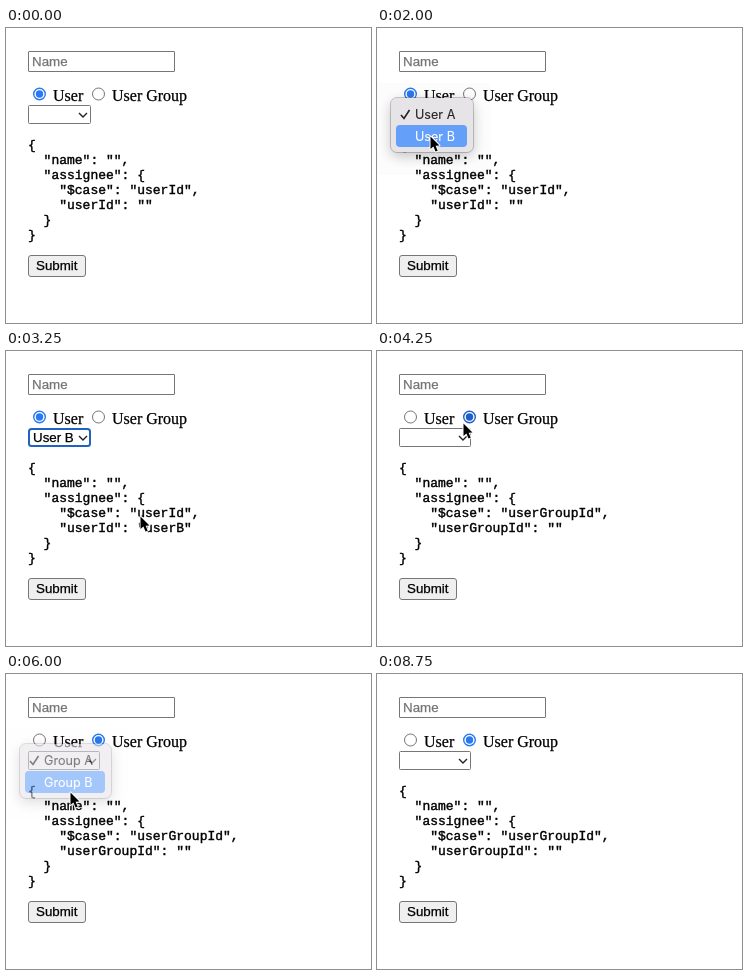
An HTML page with a canvas for the animation above (9.75 s loop, 365 by 295 pixels).

```html
<!DOCTYPE html>
<html lang="en">
<head>
<meta charset="utf-8">
<title>Assignee form</title>
<style>
html, body { margin: 0; width: 100%; height: 100%; overflow: hidden; background: #fff; }
canvas { display: block; width: 365px; height: 295px; }
</style>
</head>
<body>
<canvas id="stage" width="365" height="295"></canvas>
<script>
const WIDTH = 365, HEIGHT = 295, LOOP = 9750, STEP = 250;
const SANS = '13.333px "Liberation Sans", Arial, sans-serif';
const SERIF = '16px "Liberation Serif", "Times New Roman", serif';
const MONO = '13px "Liberation Mono", "Courier New", monospace';
const MENU = '12.6px Inter, sans-serif';
const GRAY = '#767676';

const page = document.getElementById('stage').getContext('2d');
const layer = new OffscreenCanvas(WIDTH, HEIGHT).getContext('2d');
let ctx = page;

// A gesture moves the pointer through evenly timed points in four steps, then rests.
const gestures = [
  { start: 750, path: [[157, 104], [53, 85], [53, 104]] },
  { start: 2000, path: [[53, 108], [51, 126], [146, 180]] },
  { start: 3250, path: [[134, 165], [86, 72]] },
  { start: 4750, path: [[76, 82], [62, 107], [61, 111]] },
  { start: 6000, path: [[64, 118], [150, 174], [36, 63]] },
  { start: 7250, path: [[36, 64], [56, 231], [88, 68]] },
  { start: 8500, path: [[87, 67], [87, 67]] }
];

function pointerAt(time) {
  const gesture = gestures.findLast(g => g.start <= time);
  if (!gesture || time >= 8750) return null;
  const { start, path } = gesture;
  const steps = Math.min(4, Math.floor((time - start) / STEP));
  const along = steps / 4 * (path.length - 1);
  const i = Math.min(Math.floor(along), path.length - 2);
  const [a, b] = [path[i], path[i + 1]];
  return a.map((v, axis) => v + (b[axis] - v) * (along - i));
}

function stateAt(time) {
  const within = (from, to) => time >= from && time < to;
  const chosen = within(2750, 4250) || within(6250, 7250);
  const open = within(1250, 2500) || within(5000, 6000);
  const fading = within(2500, 2750) || within(6000, 6250);
  return {
    pointer: pointerAt(time),
    group: within(4250, 7250) || within(8250, LOOP),
    value: chosen ? 'B' : '',
    menu: open ? 1 : fading ? 0.58 : 0,
    pick: within(1750, 2750) || within(5250, 6250) ? 1 : 0
  };
}

// A hairline outline gives the glyphs their heavier weight.
function text(str, x, y, font, color = '#000', weight = 0.25) {
  ctx.font = font;
  ctx.fillStyle = ctx.strokeStyle = color;
  ctx.lineWidth = weight;
  ctx.fillText(str, x, y);
  ctx.strokeText(str, x, y);
}

function box(x, y, w, h, r, fill, stroke, width = 1) {
  ctx.beginPath();
  ctx.roundRect(x, y, w, h, r);
  if (fill) {
    ctx.fillStyle = fill;
    ctx.fill();
  }
  if (stroke) {
    ctx.strokeStyle = stroke;
    ctx.lineWidth = width;
    ctx.stroke();
  }
}

function line(points, color, width) {
  ctx.beginPath();
  points.forEach(([x, y]) => ctx.lineTo(x, y));
  ctx.strokeStyle = color;
  ctx.lineWidth = width;
  ctx.stroke();
}

function radio(x, on, pointer) {
  const hover = pointer && Math.hypot(pointer[0] - x, pointer[1] - 66) < 9;
  const color = !on ? GRAY : hover ? '#1d5fc9' : '#2879f2';
  ctx.beginPath();
  ctx.arc(x, 66, on ? 5.8 : 6, 0, Math.PI * 2);
  ctx.strokeStyle = color;
  ctx.lineWidth = on ? 1.4 : 1;
  ctx.stroke();
  if (!on) return;
  ctx.beginPath();
  ctx.arc(x, 66, 3.7, 0, Math.PI * 2);
  ctx.fillStyle = color;
  ctx.fill();
}

const label = s => s.group ? 'Group ' : 'User ';

function select(s) {
  const width = s.group ? 71 : 62;
  if (s.value) box(23, 78, width - 1, 17, 2.5, '#fff', '#1f62c4', 2);
  else box(22.5, 77.5, width, 18, 1, '#fff', GRAY);
  if (s.value) text(label(s) + s.value, 27, 91, SANS);
  const mid = 15 + width;
  line([[mid - 4, 85], [mid, 89], [mid + 4, 85]], '#222', 1.4);
}

function json(s) {
  const kind = s.group ? 'group' : 'user';
  const key = s.group ? 'userGroupId' : 'userId';
  const id = s.value && kind + s.value;
  const data = { name: '', assignee: { $case: key, [key]: id } };
  JSON.stringify(data, null, 2).split('\n')
    .forEach((row, i) => text(row, 22, 121 + i * 15, MONO, '#000', 0.4));
}

function menu(s) {
  const width = s.group ? 91 : 82;
  ctx.fillStyle = 'rgba(0,0,0,0.012)';
  ctx.fillRect(0, 55, width + 31, 92);
  ctx.save();
  ctx.shadowColor = 'rgba(0,0,0,0.24)';
  ctx.shadowBlur = 14;
  ctx.shadowOffsetY = 4;
  box(14, 70, width, 54, 6, '#e7e4e8');
  ctx.restore();
  box(13.5, 69.5, width + 1, 55, 6.5, null, 'rgba(0,0,0,0.2)');
  box(19, 75 + s.pick * 22, width - 11, 22, 4, '#649ff9');
  ['A', 'B'].forEach((letter, i) => {
    const color = i === s.pick ? '#fff' : '#222';
    text(label(s) + letter, 38, 91 + i * 22, MENU, color, 0.1);
    if (i === 0) line([[24, 87], [27, 90.5], [32.5, 82]], color, 1.6);
  });
}

// The menu fades as one flat picture.
function fadeMenu(s) {
  layer.clearRect(0, 0, WIDTH, HEIGHT);
  ctx = layer;
  menu(s);
  ctx = page;
  ctx.globalAlpha = s.menu;
  ctx.drawImage(layer.canvas, 0, 0);
  ctx.globalAlpha = 1;
}

function arrow([x, y]) {
  ctx.save();
  ctx.translate(x + 0.5, y + 0.5);
  ctx.scale(0.9, 0.9);
  ctx.beginPath();
  [[0, 0], [0, 14], [3.2, 11.2], [5.6, 16.8], [8, 15.7], [5.7, 10.3], [10, 10]]
    .forEach(([px, py]) => ctx.lineTo(px, py));
  ctx.closePath();
  ctx.lineJoin = 'round';
  ctx.strokeStyle = '#fff';
  ctx.lineWidth = 2;
  ctx.stroke();
  ctx.fillStyle = '#000';
  ctx.fill();
  ctx.restore();
}

function draw(time) {
  const s = stateAt(time);
  ctx.fillStyle = '#fff';
  ctx.fillRect(0, 0, WIDTH, HEIGHT);

  box(22.5, 23.5, 146, 20, 0.5, '#fff', GRAY);
  text('Name', 26, 38, SANS, '#757575');

  radio(33.5, !s.group, s.pointer);
  text('User', 47, 73, SERIF);
  radio(92.5, s.group, s.pointer);
  text('User Group', 106, 73, SERIF);

  select(s);
  json(s);

  const pressing = s.pointer && s.pointer[1] > 227;
  box(22.5, 227.5, 57, 21, 2.5, pressing ? '#e5e5e5' : '#efefef', GRAY);
  text('Submit', 30, 242, SANS);

  if (s.menu) fadeMenu(s);
  if (s.pointer) arrow(s.pointer);
}

const begin = performance.now();
function tick() {
  draw((performance.now() - begin) % LOOP);
  requestAnimationFrame(tick);
}
tick();
</script>
</body>
</html>
```
